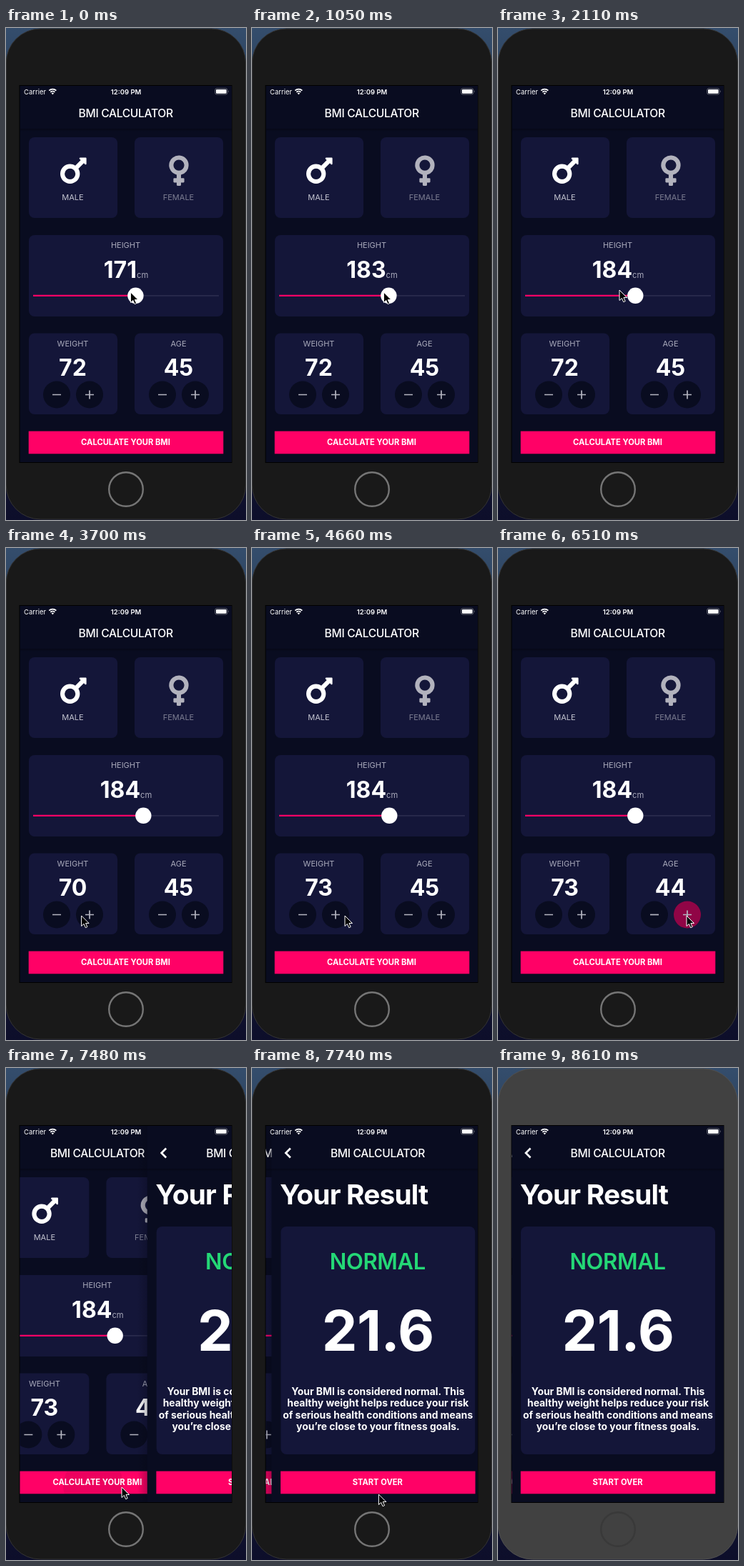
An HTML page that plays this animation: 336x689 px, repeating every 8.71 s.

```html
<!DOCTYPE html>
<html lang="en">
<head>
<meta charset="utf-8">
<title>BMI calculator</title>
<style>
  html, body { margin: 0; width: 100%; height: 100%; overflow: hidden; background: #0c0e28; }
  svg { display: block; width: 336px; height: 689px; }
  text { font-family: Inter, Roboto, sans-serif; text-anchor: middle; fill: #fff; white-space: pre; }
  .title { font-size: 15.6px; font-weight: 500; letter-spacing: -.32px; }
  .label { font-size: 11px; fill: #a9aabb; }
  .num { font-size: 32px; font-weight: 700; }
  .unit { font-size: 11.2px; font-weight: 400; fill: #a9aabb; }
  .cta { font-size: 11.2px; font-weight: 700; }
  .status { font-size: 9.5px; }
  .card { fill: #141639; }
  .bg { fill: #090c20; }
  .pink { fill: #ff0166; }
</style>
</head>
<body>
<svg viewBox="0 0 336 689">
  <defs>
    <clipPath id="screen"><rect x="19.5" y="81" width="296.5" height="527"/></clipPath>
    <clipPath id="ctaBox"><rect x="32" y="565" width="272" height="31"/></clipPath>
    <linearGradient id="desk" x2="0" y2="1">
      <stop stop-color="#344d6c"/><stop offset=".25" stop-color="#233550"/><stop offset="1" stop-color="#0d0e2a"/>
    </linearGradient>
    <linearGradient id="edge">
      <stop stop-color="#04050f" stop-opacity="0"/><stop offset="1" stop-color="#04050f" stop-opacity=".25"/>
    </linearGradient>
    <linearGradient id="drop" x2="0" y2="1">
      <stop stop-color="#04050f" stop-opacity=".5"/><stop offset="1" stop-color="#04050f" stop-opacity="0"/>
    </linearGradient>
    <g id="bar">
      <rect class="bg" x="19" y="80" width="298" height="529"/>
      <rect x="19" y="141" width="298" height="4" fill="url(#drop)"/>
      <text class="title" x="167.7" y="124.6">BMI CALCULATOR</text>
    </g>
    <rect id="cta" class="pink" x="31.7" y="564.6" width="272.6" height="31.7"/>
  </defs>

  <rect width="336" height="689" fill="url(#desk)"/>
  <rect id="body" x=".2" y="1" width="335.4" height="687" rx="48" stroke-width="1"/>
  <circle id="home" cx="168" cy="646" r="23.8" fill="none" stroke-width="2.4"/>
  <rect x="18.500" y="80" width="298" height="529" fill="#000"/>

  <g clip-path="url(#screen)">
    <g id="form">
      <use href="#bar"/>
      <g class="card">
        <rect x="32" y="153" width="124" height="113" rx="8"/>
        <rect x="180" y="153" width="124" height="113" rx="8"/>
        <rect x="32" y="290" width="272" height="114" rx="8"/>
        <rect x="32" y="427.5" width="124" height="113.5" rx="8"/>
        <rect x="180" y="427.5" width="124" height="113.5" rx="8"/>
      </g>
      <path fill="#fff" transform="translate(76 175.4) scale(.095)" d="M372 64h-79c-10.7 0-16 12.9-8.5 20.4l16.9 16.9-80.7 80.7C198.5 167.6 172 160 144 160 64.5 160 0 224.5 0 304s64.5 144 144 144 144-64.5 144-144c0-28-7.6-54.2-20.9-76.6l80.7-80.7 16.9 16.9c7.6 7.6 20.4 2.2 20.4-8.5V76c0-6.6-5.4-12-12-12zM144 384a80 80 0 1 1 0-160 80 80 0 0 1 0 160z"/>
      <path fill="#b2b2bd" transform="translate(228.3 175.4) scale(.095)" d="M288 176a144 144 0 1 0-176 140.4V368H76q-12 0-12 12v40q0 12 12 12h36v36q0 12 12 12h40q12 0 12-12v-36h36q12 0 12-12v-40q0-12-12-12h-36v-51.6A144 144 0 0 0 288 176zM64 176a80 80 0 1 1 160 0 80 80 0 0 1-160 0z"/>
      <text class="label" x="93.5" y="241" style="fill:#c3c4d0">MALE</text>
      <text class="label" x="241.5" y="241" style="fill:#7d7e92">FEMALE</text>
      <text class="label" x="167.5" y="308">HEIGHT</text>
      <text class="label" x="93.5" y="445.5">WEIGHT</text>
      <text class="label" x="241.5" y="445.5">AGE</text>
      <text class="num" x="168" y="350"><tspan id="height"></tspan><tspan class="unit">cm</tspan></text>
      <text class="num" id="weight" x="93.5" y="487"></text>
      <text class="num" id="age" x="241.5" y="487"></text>
      <rect x="38" y="374" width="260" height="1.8" fill="#292a4c"/>
      <rect class="pink" id="track" x="38" y="373.7" height="2.2"/>
      <circle id="knob" cy="374.8" r="11.2" fill="#fff"/>
      <g id="steppers"></g>
      <use href="#cta"/>
      <circle id="ripple" cx="162" cy="585" fill="#000" opacity=".07" clip-path="url(#ctaBox)"/>
      <text class="cta" x="167.5" y="584">CALCULATE YOUR BMI</text>
    </g>

    <g id="result">
      <rect x="5" y="80" width="14" height="529" fill="url(#edge)"/>
      <use href="#bar"/>
      <path d="M45.5 112.5 39 119l6.5 6.5" fill="none" stroke="#fff" stroke-width="2.7"/>
      <text x="30.7" y="191" style="font-size:38.8px;font-weight:700;letter-spacing:-.8px;text-anchor:start">Your Result</text>
      <rect class="card" x="32" y="222" width="272" height="319" rx="8"/>
      <text x="167.5" y="282" style="font-size:31px;font-weight:600;letter-spacing:-.35px;fill:#24d876">NORMAL</text>
      <text x="168" y="396.3" style="font-size:79px;font-weight:700;letter-spacing:-.5px">21.6</text>
      <g id="advice" style="font-size:13.87px;font-weight:700"></g>
      <use href="#cta"/>
      <text class="cta" x="167.5" y="584">START OVER</text>
    </g>

    <text class="status" x="25" y="92.5" style="text-anchor:start">Carrier</text>
    <text class="status" x="168" y="92.5" style="font-weight:600">12:09 PM</text>
    <g fill="none" stroke="#fff" stroke-width="1.8">
      <path d="M60.3 87.6a7.2 7.2 0 0 1 10 0M62.3 89.8a4.3 4.3 0 0 1 6 0"/>
      <path d="M65.3 93.3l-1.7-1.9a2.5 2.5 0 0 1 3.4 0z" fill="#fff" stroke="none"/>
    </g>
    <rect x="292.7" y="84.6" width="17.2" height="8.4" rx="2.3" fill="none" stroke="#73757f" stroke-width=".8"/>
    <rect x="294" y="85.9" width="14.6" height="5.8" rx="1.2" fill="#fff"/>
    <path d="M311 87.2q1.6 1.6 0 3.2z" fill="#73757f"/>
  </g>

  <path id="cursor" d="M0 0V14.5L3.4 11.4 5.7 16.7 8.2 15.6 5.9 10.5H10.5Z" fill="#000" stroke="#fff" stroke-width="1" stroke-linejoin="round"/>
</svg>

<script>
const LOOP = 8710;
const $ = id => document.getElementById(id);
const set = (id, attrs) => { for (const k in attrs) $(id).setAttribute(k, attrs[k]); };
const clamp = v => Math.max(0, Math.min(1, v));
const ease = u => u * u * (3 - 2 * u);

// Keys are [time, ...values]; values ease from one key to the next.
function along(keys, t) {
  let i = keys.findIndex(k => k[0] > t);
  if (i < 0) i = keys.length;
  if (i === 0) return keys[0].slice(1);
  const a = keys[i - 1], b = keys[i] || a;
  const u = b === a ? 0 : ease((t - a[0]) / (b[0] - a[0]));
  return a.slice(1).map((v, j) => v + (b[j + 1] - v) * u);
}

// Last value whose time has passed.
const stepped = (keys, t) => keys.filter(k => k[0] <= t).pop()[1];

function bezier(x1, y1, x2, y2, x) {
  const at = (a, b, s) => 3 * a * s * (1 - s) ** 2 + 3 * b * s * s * (1 - s) + s ** 3;
  let lo = 0, hi = 1;
  for (let i = 0; i < 20; i++) {
    const mid = (lo + hi) / 2;
    if (at(x1, x2, mid) < x) lo = mid; else hi = mid;
  }
  return at(y1, y2, lo);
}

const heights = [[200, 171], [620, 93], [1060, 183], [1500, 191], [1600, 191], [1850, 184]];
const weights = [[0, 72], [3270, 71], [3440, 70], [4140, 71], [4310, 72], [4660, 73]];
const ages = [[0, 45], [5460, 44], [6600, 45]];

const pointer = [
  [1850, 185, 370], [2110, 170, 367], [2480, 170, 367], [2910, 74, 515],
  [3500, 74, 515], [3870, 130, 515], [4750, 130, 515], [5190, 205, 516],
  [5720, 205, 516], [6160, 264, 515], [6720, 264, 515], [7120, 162, 587],
  [7620, 162, 587], [8170, 286, 668], [8340, 292, 690]
];

// Each button: centre, sign, then [start, end] of its presses.
const buttons = [
  [71, "-", [3300, 3580]],
  [117, "+", [4170, 4400], [4690, 4950]],
  [219, "-", [5490, 5760]],
  [265, "+", [6450, 6860]]
];

$("steppers").innerHTML = buttons.map(([x, sign], i) => `
  <circle class="bg" cx="${x}" cy="513.5" r="19"/>
  <circle class="pink" id="ink${i}" cx="${x}" cy="513.5" r="19"/>
  <path d="M${x - 6} 513.5h12${sign === "+" ? "m-6-6v12" : ""}" stroke="#b4b5c0" stroke-width="1.7"/>`).join("");

$("advice").innerHTML = [
  "Your BMI is considered normal. This",
  "healthy weight helps reduce your risk",
  "of serious health conditions and means",
  "you’re close to your fitness goals."
].map((line, i) => `<text x="168" y="${457.6 + i * 16.6}">${line}</text>`).join("");

function draw(t) {
  const height = along(heights, t)[0];
  const knobX = 38 + 260 * height / 310;
  $("height").textContent = Math.round(height);
  $("weight").textContent = stepped(weights, t);
  $("age").textContent = stepped(ages, t);
  set("track", { width: knobX - 38 });
  set("knob", { cx: knobX });

  buttons.forEach(([, , ...presses], i) => {
    const glow = presses.map(([a, b]) => Math.min(clamp((t - a) / 60), clamp((b - t) / 160)));
    set("ink" + i, { opacity: .55 * Math.max(...glow) });
  });

  const slide = t < 7404 ? 0 : bezier(.35, .91, .33, .97, clamp((t - 7404) / 500));
  set("form", { transform: `translate(${-99 * slide} 0)` });
  set("result", { transform: `translate(${298 * (1 - slide)} 0)`, visibility: slide ? "visible" : "hidden" });
  set("ripple", { r: Math.max(0, t - 7270) * .2 });

  const [x, y] = t < 1850 ? [knobX - 7, 370] : along(pointer, t);
  set("cursor", { transform: `translate(${x} ${y})`, visibility: t < 8340 ? "visible" : "hidden" });

  const idle = t >= 8610;
  set("body", { fill: idle ? "#414141" : "#191919", stroke: idle ? "#505050" : "#343434" });
  set("home", { stroke: idle ? "#393939" : "#757575" });
}

function frame() {
  draw(performance.now() % LOOP);
  requestAnimationFrame(frame);
}
frame();
</script>
</body>
</html>
```
